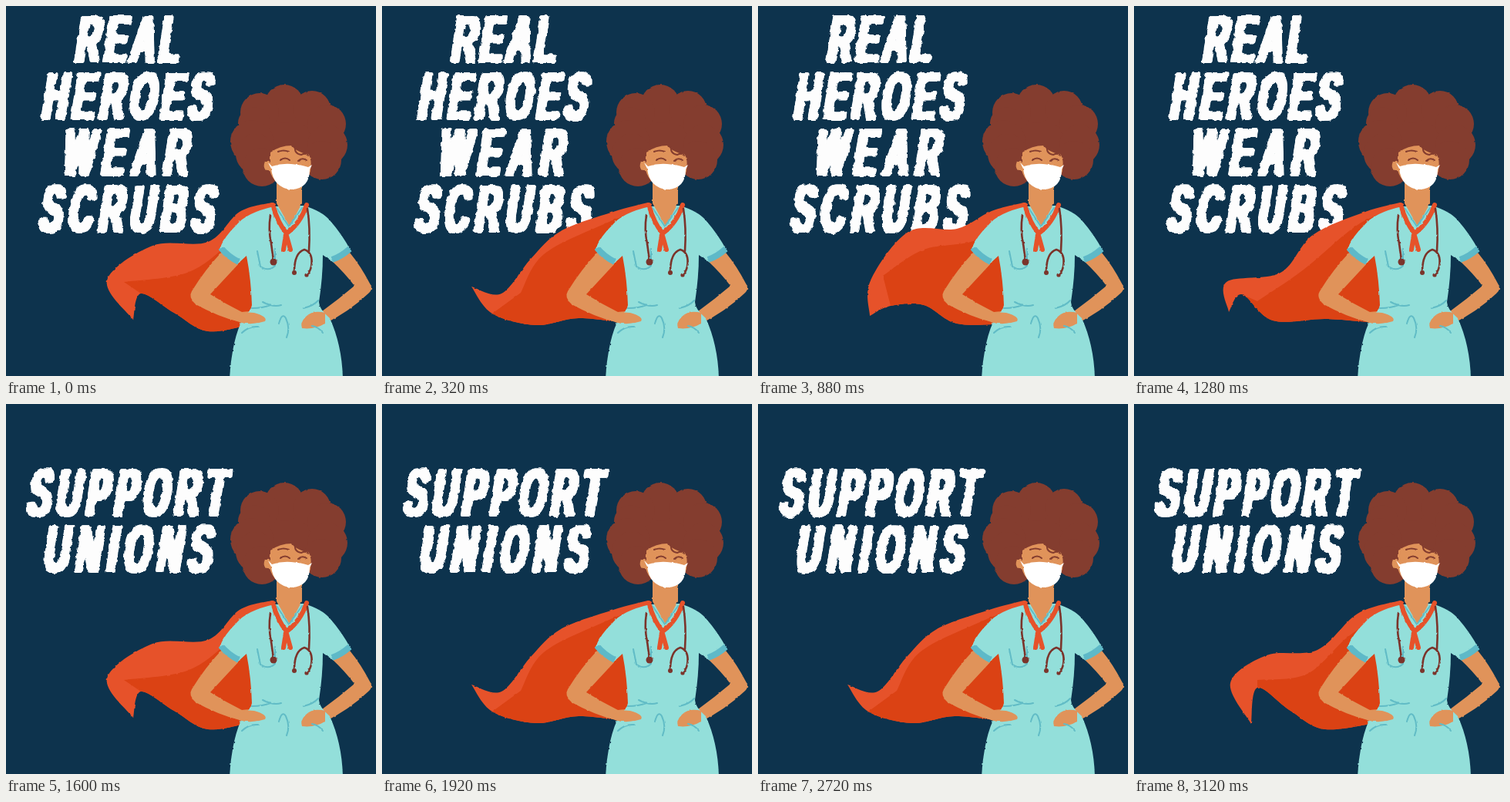
An HTML page for the animation above (3.2 s loop, 480 by 480 pixels).

```html
<!DOCTYPE html>
<html lang="en">
<head>
<meta charset="utf-8">
<title>Real heroes wear scrubs</title>
<style>
  html, body { margin: 0; width: 100%; height: 100%; overflow: hidden; background: #0d334d; }
  svg { display: block; width: 100%; height: 100%; }
  text { font: bold 87px "Liberation Sans", Arial, sans-serif; fill: #fdfdfd; }
  .skin { fill: #e0935a; }
  .hair { fill: #843d2f; }
  .scrub { fill: #93dfda; }
  .fold, .cuff, .tube, .tie, .brow { fill: none; stroke-linecap: round; stroke-linejoin: round; }
  .fold { stroke: #61bcc6; stroke-width: 2; }
  .cuff { stroke: #5eb9c8; stroke-width: 8; stroke-linecap: butt; }
  .tube { stroke: #7b342b; stroke-width: 2.6; }
  .tie { stroke: #e6522a; stroke-width: 6; }
  .brow { stroke: #843d2f; stroke-width: 2; }
</style>
</head>
<body>
<svg viewBox="0 0 480 480">
  <defs>
    <filter id="brush" filterUnits="userSpaceOnUse" x="0" y="0" width="480" height="480" color-interpolation-filters="sRGB">
      <feMorphology operator="dilate" radius="3 1"/>
      <feGaussianBlur stdDeviation="1.3"/>
      <feComponentTransfer result="bold"><feFuncA type="linear" slope="4" intercept="-1.5"/></feComponentTransfer>
      <feTurbulence id="grain" type="fractalNoise" baseFrequency="0.13" numOctaves="2" result="noise"/>
      <feDisplacementMap in="bold" in2="noise" scale="5" xChannelSelector="R" yChannelSelector="G"/>
    </filter>
    <filter id="rough" filterUnits="userSpaceOnUse" x="0" y="0" width="480" height="490" color-interpolation-filters="sRGB">
      <feTurbulence type="fractalNoise" baseFrequency="0.2" numOctaves="1" seed="4" result="noise"/>
      <feDisplacementMap in="SourceGraphic" in2="noise" scale="2.5" xChannelSelector="R" yChannelSelector="G"/>
    </filter>
    <clipPath id="capeClip"><path id="capeEdge"/></clipPath>
  </defs>

  <rect width="480" height="480" fill="#0d334d"/>
  <g id="heroes" filter="url(#brush)"></g>
  <g id="unions" filter="url(#brush)"></g>

  <g filter="url(#rough)">
    <path id="cape" fill="#e6522a"/>
    <path id="lining" fill="#db4214" clip-path="url(#capeClip)"/>

    <g class="hair">
      <ellipse cx="367" cy="170" rx="62" ry="50"/>
      <circle cx="361" cy="127" r="25"/>
      <circle cx="329" cy="138" r="25"/>
      <circle cx="397" cy="134" r="24"/>
      <circle cx="322" cy="152" r="21"/>
      <circle cx="319" cy="176" r="28"/>
      <circle cx="324" cy="192" r="26"/>
      <circle cx="332" cy="209" r="25"/>
      <circle cx="416" cy="153" r="25"/>
      <circle cx="417" cy="180" r="26"/>
      <circle cx="410" cy="200" r="25"/>
    </g>

    <!-- arms -->
    <path class="skin" d="M281,318 Q258,342 241,370 Q236,378 246,387 Q275,403 303,410 Q313,415 334,410 Q340,405 335,402
      Q323,394 306,397 Q284,386 265,374 L304,332 Z"/>
    <path class="skin" d="M423,331 Q440,347 452,363 Q432,380 410,396 Q396,397 390,402 Q380,410 383,418 Q398,421 412,413
      Q446,396 470,373 Q477,367 472,360 Q460,337 446,320 Z"/>

    <!-- dress -->
    <path class="scrub" d="M348,260 Q312,268 299,284 Q284,298 277,315 L301,334 L312,324 Q318,355 319,388 Q318,395 308,404
      Q293,432 290,484 H437 Q436,440 420,405 Q406,393 406,384 Q411,352 411,323 L424,332 L447,317 Q436,296 420,278
      Q410,266 386,259 Z"/>
    <path class="cuff" d="M279,314 Q288,325 302,332 M423,329 Q435,325 446,315"/>
    <path class="skin" d="M302,402 Q308,396 322,398 Q340,403 336,409 Q318,415 302,410 Z
      M414,398 Q398,394 389,403 Q381,411 384,418 Q400,420 414,412 Z"/>
    <g class="fold">
      <path d="M326,318 L330,338 Q341,345 349,337 L349,315"/>
      <path d="M333,384 Q346,391 357,388 M319,392 Q333,392 343,388 M386,392 Q399,389 405,382"/>
      <path d="M354,412 Q358,397 363,405 Q369,418 364,430 M306,424 Q315,415 327,416 M397,415 Q405,416 411,424"/>
    </g>

    <!-- neck and collar -->
    <path class="skin" d="M351,228 V256 L368,286 L384,256 V228 Z"/>
    <path class="fold" stroke-width="3" d="M351,262 L367,286 L384,262"/>
    <path class="tie" d="M346,258 Q353,282 364,295 Q382,282 390,258 M363,297 L360,316 M364,298 L369,316" stroke-width="5"/>

    <!-- stethoscope -->
    <path class="tube" d="M343,272 Q340,290 344,308 L347,330 M391,263 Q395,288 393,318
      M374,345 Q374,320 387,316 Q399,320 396,338 Q394,346 390,349"/>
    <g fill="#7b342b">
      <circle cx="347" cy="332" r="4.5"/>
      <circle cx="374" cy="346" r="3"/>
      <circle cx="390" cy="349" r="2.6"/>
    </g>

    <!-- face -->
    <path class="skin" d="M343,190 Q355,181 371,181 Q374,188 393,193 Q397,200 395,214 Q388,237 369,237 Q348,234 342,213
      Q333,214 335,204 Q338,200 343,203 Z"/>
    <path class="brow" d="M353,189 Q359,186 367,189" stroke-width="4"/>
    <path class="brow" d="M375,183 Q374,192 383,193 Q389,190 392,194"/>
    <path class="brow" d="M356,200 Q362,195 368,200 M379,201 Q384,196 390,200"/>
    <path d="M340,203 L345,208 Q357,204 370,205 Q384,206 392,209 L397,206 L394,212 Q394,237 370,238 Q347,236 344,211 Z" fill="#fff"/>
  </g>
</svg>

<script>
const STEP = 80, LOOP = 3200, FLAP = 1600;
const $ = id => document.getElementById(id);

// Lettering: text, left, baseline, tracking
const SLIM = 0.506;
function letter(group, lines) {
  $(group).innerHTML = lines.map(([word, x, y, gap]) =>
    `<text transform="translate(${x} ${y}) skewX(-9) scale(${SLIM} 1)" letter-spacing="${gap / SLIM}">${word}</text>`
  ).join('');
}
letter('heroes', [['REAL', 88, 73, 5], ['HEROES', 45, 147, 6.6], ['WEAR', 71, 220, 9.5], ['SCRUBS', 41, 293, 8.2]]);
letter('unions', [['SUPPORT', 26, 145, 7.3], ['UNIONS', 47, 218, 9.2]]);

// Cape poses: four points on the top edge, the tip, three underneath, three along the lining
const curl = [303,267, 262,306, 190,311, 131,356, 165,407, 175,373, 218,398, 262,422, 290,308, 235,346, 153,358];
const fold = [303,263, 270,303, 192,310, 128,354, 160,402, 175,373, 216,391, 260,422, 292,306, 235,341, 150,343];
const billow = [303,266, 258,289, 195,293, 146,356, 145,402, 172,389, 215,388, 258,412, 285,303, 215,316, 162,350];
const reach = [300,267, 232,292, 193,328, 155,373, 116,364, 143,399, 200,414, 255,405, 290,282, 210,322, 180,372];
const droop = [300,267, 232,297, 190,346, 120,358, 123,397, 140,374, 180,408, 250,406, 290,284, 220,342, 160,383];
const sweep = [290,272, 238,319, 172,326, 125,362, 152,415, 160,368, 203,398, 248,422, 280,300, 225,350, 160,358];
const keys = [
  [0, curl], [80, billow], [320, reach], [480, droop], [720, sweep],
  [800, fold], [880, billow], [1120, reach], [1280, droop], [1520, sweep]
];

function keyAt(i) {
  const n = keys.length, turn = Math.floor(i / n), [t, pose] = keys[i - turn * n];
  return [t + turn * FLAP, pose];
}

// Smooth blend through the poses, wrapping around
function poseAt(t) {
  let i = keys.length - 1;
  while (keys[i][0] > t) i--;
  const [[ta, a], [tb, b], [tc, c], [td, d]] = [-1, 0, 1, 2].map(k => keyAt(i + k));
  const span = tc - tb, u = (t - tb) / span, v = 1 - u;
  return b.map((from, k) => {
    const m0 = (c[k] - a[k]) / (tc - ta) * span;
    const m1 = (d[k] - from) / (td - tb) * span;
    return (1 + 2 * u) * v * v * from + u * v * v * m0 + u * u * (3 - 2 * u) * c[k] - u * u * v * m1;
  });
}

function curve(points) {
  let path = '';
  for (let i = 0; i < points.length - 1; i++) {
    const a = points[i - 1] || points[i], b = points[i], c = points[i + 1], d = points[i + 2] || c;
    const h1 = [0, 1].map(k => b[k] + (c[k] - a[k]) / 6);
    const h2 = [0, 1].map(k => c[k] - (d[k] - b[k]) / 6);
    path += `C${h1} ${h2} ${c}`;
  }
  return path;
}

function drawCape(t) {
  const flat = poseAt(t), p = [];
  for (let i = 0; i < flat.length; i += 2) p.push([flat[i], flat[i + 1]]);
  const neck = [345, 255], hip = [322, 412], inner = [345, 261], under = p[5];
  const edge = `M${neck}${curve([neck, ...p.slice(0, 5)])}${curve([...p.slice(4, 8), hip])}L350,400Z`;
  $('cape').setAttribute('d', edge);
  $('capeEdge').setAttribute('d', edge);
  $('lining').setAttribute('d', `M${inner}${curve([inner, ...p.slice(8)])}L${under}V480H352Z`);
}

let shown = -1;
function tick(now) {
  const step = Math.floor(now % LOOP / STEP);
  if (step !== shown) {
    shown = step;
    const t = step * STEP, second = t >= LOOP / 2;
    $('heroes').style.display = second ? 'none' : '';
    $('unions').style.display = second ? '' : 'none';
    $('grain').setAttribute('seed', 1 + (step >> 1) % 4);
    drawCape(t % FLAP);
  }
  requestAnimationFrame(() => tick(performance.now()));
}
tick(performance.now());
</script>
</body>
</html>
```
